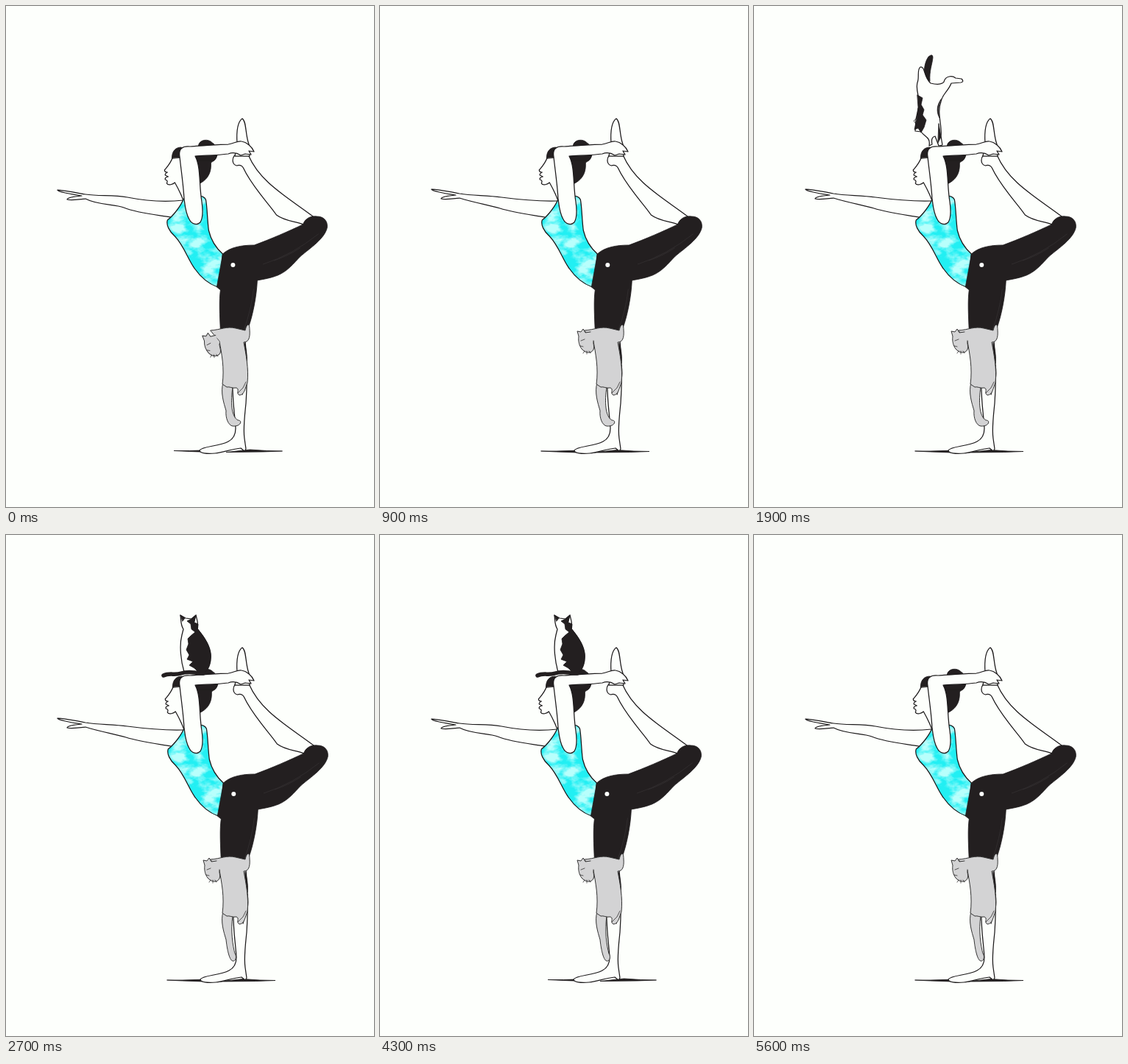
An HTML page that plays this animation: 500x681 px, repeating every 5700 ms.

```html
<!DOCTYPE html>
<html lang="en">
<head>
<meta charset="utf-8">
<title>Yoga with cats</title>
<style>
html, body { margin: 0; width: 100%; height: 100%; overflow: hidden; background: #fdfffc; }
svg { display: block; width: 500px; height: 681px; }
path { stroke: #1c1a1b; stroke-width: 1.25; stroke-linejoin: round; stroke-linecap: round; fill: none; }
.skin { fill: #fdfffc; }
.ink { fill: #231f20; stroke-width: .8; }
.grey { fill: #d3d3d4; stroke: #333; stroke-width: 1; }
.fine { stroke-width: .7; }
.sheen path { stroke: #343031; stroke-width: .8; }
</style>
</head>
<body>
<svg viewBox="0 0 500 681">
  <defs>
    <path id="shirt" d="M242 262C238 272 228 285 220 291C218 297 222 306 230 313C242 325 248 345 257 357C264 367 274 377 288 382C292 370 294 350 295 337C285 328 279 318 276 305C274 290 274 272 272 263C269 256 250 256 242 262Z"/>
    <clipPath id="shirtClip"><use href="#shirt"/></clipPath>
    <!-- pale watercolour blotches -->
    <filter id="wash" x="0" y="0" width="1" height="1" color-interpolation-filters="sRGB">
      <feTurbulence type="fractalNoise" baseFrequency=".045 .07" numOctaves="4" seed="5"/>
      <feColorMatrix values="0 0 0 0 .72  0 0 0 0 1  0 0 0 0 .99  3.5 0 0 0 -1.35"/>
    </filter>
  </defs>

  <path id="ground" class="ink" d="M219 605L240 605 275 604 268 607 240 606ZM290 607L322 603.5 345 605 366 605.5 340 606.5Z"/>

  <g id="leg">
    <path class="skin" d="M326 455C329 485 329 510 327 540C325 560 323 575 325 588L327 602 325 605 320 601C308 602 296 607 285 608C274 609 264 608 264 604C268 598 290 599 303 592C311 588 313 582 313 574C312 555 308 535 309 505L312 455Z"/>
    <path class="ink" d="M325 458C328 468 329 478 328 486L324 478Z"/>
    <path d="M328 488C331 510 325 514 322 528"/>
  </g>

  <path id="arm" class="skin"/>

  <g id="body">
    <path class="skin" style="stroke:none" d="M228 205C224 213 222 216 217 224L221 243C230 240 236 250 242 264L269 262 268 204Z"/>
    <path d="M227 206C224 214 221 217 216 223Q216 226 220 226Q216 228 217 230L221 232Q216 233 217 236Q221 237 219 241C221 245 228 242 230 240C234 247 238 255 241 263"/>
    <path class="ink" d="M226 207C226 197 231 192 239 192L237 206ZM257 204L288 201C286 212 279 211 279 214C280 229 272 238 262 242Z"/>
    <path class="ink" d="M262 190C263 181 276 180 281 186C289 190 289 207 283 210L260 210Z"/>
    <g clip-path="url(#shirtClip)">
      <rect x="215" y="255" width="85" height="130" fill="#22eff3"/>
      <rect x="215" y="255" width="85" height="130" filter="url(#wash)"/>
    </g>
    <use href="#shirt"/>
    <path class="skin" d="M330 203C346 240 382 259 419 287L405 297C393 292 380 293 368 284C359 270 335 246 323 220Q320 215 314 217C307 215 308 207 311 203Z"/>
    <path class="ink" d="M404 297C407 289 414 285 423 286C432 286 438 292 437 301C434 316 414 329 401 340C391 350 384 360 370 366C360 370 352 371 342 373C341 395 336 420 330 437L325 443 292 442C291 420 290 400 292 386L287 382C290 365 293 350 295 337C305 328 320 325 338 325C360 317 385 306 404 297Z"/>
    <g class="sheen"><path d="M350 351Q390 338 425 310M365 346Q385 339 400 329M324 440Q334 412 337 385"/></g>
    <circle cx="309" cy="352" r="3" fill="#fdfffc"/>
  </g>

  <path class="skin" d="M314 187C313 172 314 158 321 153C327 157 325 175 330 188L331 204 311 204Z"/>
  <path class="skin" d="M236 205C234 194 240 190 250 191C270 190 290 188 302 188C309 187 315 183 320 184C327 185 334 191 337 198L330 197 333 202 325 201 319 203C313 199 307 199 302 201C288 203 270 203 257 204C265 219 262 242 266 266C268 280 267 289 264 294C259 299 252 296 249 290C244 282 243 270 242 262C241 243 238 224 236 205Z"/>

  <path id="tail" class="grey"/>
  <path class="grey" d="M278 441C292 440 300 435 312 438L325 441C327 432 331 430 331 440C332 452 329 457 323 457C326 473 330 493 328 512C325 519 324 529 317 529C312 526 318 521 313 519C307 520 304 517 300 518L294 514C297 492 293 473 290 456Z"/>
  <path class="fine" d="M315 526L322 519 326 511"/>
  <g id="greyHead">
    <path class="grey" d="M286 443L279 444 276 439 273 443 268 442 270 449C269 456 271 462 274 466C279 472 287 473 290 467C292 463 289 459 290 455"/>
    <path class="fine" d="M273 455L278 453M272 462L276 463M278 469L276 472M281 469L281 473M284 469L286 472"/>
  </g>

  <g id="sitter">
    <path class="skin" d="M241 128C237 122 238 116 237 109L244 113 252 114 258 109C260 117 262 121 260 128C268 137 277 149 278 162C279 173 275 184 268 186L242 186C238 173 235 151 239 136Z"/>
    <path class="ink" d="M237 109L243 113 240 117ZM258 109L252 114 246 117 251 121 252 128 257 132 251 137 247 141 248 148 245 156 249 163 246 169 254 172 249 177 256 181 262 187H269C276 184 279 173 278 161C276 149 268 137 260 127L261 121 256 119Z"/>
    <path d="M214 191C222 187 229 191 238 188S254 187 268 188" style="stroke-width:5.5;stroke:#231f20"/>
  </g>

  <g id="diver">
    <path class="ink" d="M232 98C230 88 232 76 237 69Q243 64 243 70C242 80 238 88 239 102Z"/>
    <path class="skin" d="M222 104C225 98 221 86 226 83C233 82 230 96 240 105C248 107 255 107 258 103C260 95 269 94 274 98L282 99Q286 103 281 104L268 105C264 116 256 119 254 130C248 145 256 163 254 177L256 189 251 190 246 177Q240 178 242 188L238 190C240 178 232 178 227 171L219 170 220 154 224 136C226 123 219 116 222 104Z"/>
    <path class="ink" d="M222 121L229 125 227 134 231 141 229 148 234 155 231 165 227 172 223 166 218 168 221 155 223 138ZM254 127C250 136 250 144 252 152C247 143 249 134 254 127ZM251 160L254 178 250 186Z"/>
    <path class="fine" d="M219 159L217 156 221 153"/>
  </g>
</svg>
<script>
const FRAME = 100, COUNT = 57;
const el = id => document.getElementById(id);
const clamp = x => Math.max(0, Math.min(1, x));
const show = (id, on) => el(id).style.display = on ? "" : "none";
const place = (id, transform) => el(id).setAttribute("transform", transform);

const ARMS = [
  "M241 264C215 267 190 265 165 260C145 256 127 259 108 256C92 254 80 250 70 250C69 252 88 256 103 258C93 259 84 260 83 263C91 265 101 262 108 262C125 271 147 269 160 274C180 282 207 284 224 287",
  "M241 265C212 266 188 263 165 260C145 257 127 258 108 255C92 252 80 249 70 249C69 251 88 255 103 257C93 258 84 259 83 262C91 264 101 261 108 261C130 268 147 270 163 275C182 281 207 284 224 287"
];

// 0: curled tip, 1: hanging straight
function tailPath(k) {
  const m = (a, b) => a + (b - a) * k;
  return `M295 512C291 525 296 540 299 550C${m(298, 300)} 560 ${m(302, 303)} ${m(570, 578)} 308 ${m(571, 579)}
    C${m(319, 312)} ${m(572, 580)} ${m(322, 314)} ${m(563, 573)} ${m(315, 311)} ${m(563, 569)}
    C${m(306, 308)} 558 305 538 308 518`;
}

// two wobbling drawings; the rhythm slips once
function drawWoman(f) {
  const mixed = f === 40 || f === 56;
  const first = f < 40 ? f % 2 === 0 : f % 2 === 1;
  const a = first && !mixed;
  el("arm").setAttribute("d", ARMS[a || mixed ? 0 : 1]);
  place("body", a ? "translate(-.6 0)" : "translate(.3 0)");
  place("leg", a ? "translate(-1 0)" : "");
  place("ground", a ? "translate(9.5 -.5)" : "");
}

function drawCats(f) {
  const leap = f >= 49 && f < 55;
  show("diver", f >= 13 && f < 23 || leap);
  show("sitter", f >= 23 && f < 49);

  if (leap) {
    const p = (f - 48) / 6;
    const x = 235 - 310 * p, y = 142 - 70 * p + 150 * p * p;
    place("diver", `translate(${x} ${y}) rotate(${95 - 35 * p}) translate(-245 -128)`);
  } else {
    const drop = Math.min(0, f - 19) * 35;
    const turn = clamp((f - 20) / 3) * 80;
    place("diver", `translate(0 ${drop}) rotate(${turn} 248 189)`);
  }

  const squash = f === 23 ? .86 : 1 - .3 * clamp((f - 45) / 3);
  place("sitter", `translate(0 ${188 * (1 - squash)}) scale(1 ${squash})`);

  el("tail").setAttribute("d", tailPath(clamp((f - 20) / 4)));
  place("greyHead", f < 5 ? `translate(0 ${4 - f * .8}) rotate(${-6 + f * 1.2} 290 455)` : "");
}

function tick(now) {
  const f = Math.floor(now / FRAME) % COUNT;
  drawWoman(f);
  drawCats(f);
  requestAnimationFrame(tick);
}
tick(0);
</script>
</body>
</html>
```
